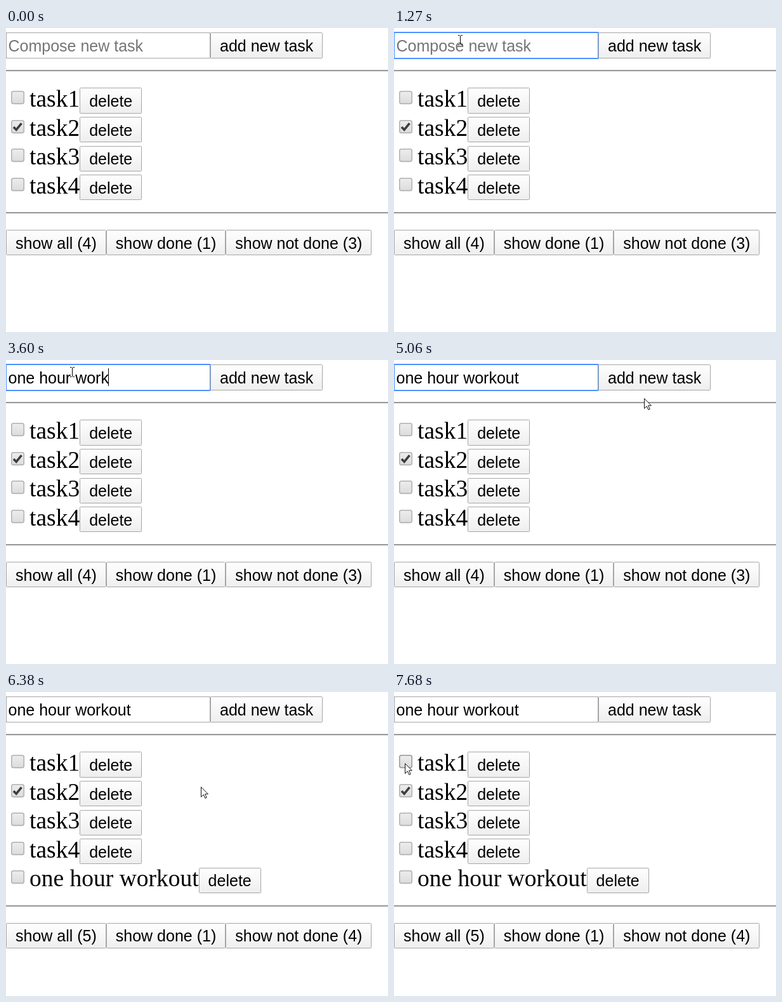
Write an HTML page that moves like this. It is 602 px wide and 479 px high and loops after 8 s.

```html
<!DOCTYPE html>
<html lang="en">
<head>
<meta charset="utf-8">
<title>Task list</title>
<style>
  html, body { margin: 0; width: 100%; height: 100%; overflow: hidden; background: #fff; }
  svg { display: block; width: 602px; height: 479px; }
  text { white-space: pre; }
  .ui { font: 25px "Liberation Sans", Arial, sans-serif; }
  .task { font: 37.5px "Liberation Serif", "Times New Roman", serif; }
</style>
</head>
<body>
<svg viewBox="0 0 602 479">
  <defs>
    <linearGradient id="face" x2="0" y2="1">
      <stop stop-color="#fefefe"/><stop offset=".4" stop-color="#f8f8f8"/><stop offset="1" stop-color="#eee"/>
    </linearGradient>
    <linearGradient id="down" x2="0" y2="1">
      <stop stop-color="#e4e4e4"/><stop offset="1" stop-color="#f0f0f0"/>
    </linearGradient>
    <linearGradient id="box" x2="0" y2="1">
      <stop stop-color="#ededed"/><stop offset="1" stop-color="#dcdcdc"/>
    </linearGradient>
  </defs>
  <g id="page"></g>
</svg>
<script>
const LOOP = 8000, FOCUS = 720, PRESS = 5760, ADDED = 5920, BLINK = 530;
const ROW = 45.6, LIST = 94.4, BUTTON_H = 40.2, BASELINE = 29.6, PAD = 15;
const TEXT_X = 3.5, TASK_X = 37;

const phrase = "one hour workout";
const bursts = [
  { at: 1720, gap: 156, size: 13 },
  { at: 3990, gap: 115, size: 3 }
];
// Pointer waypoints: time, x, y
const path = [
  [70, 376, 367], [560, 104, 19],
  [4860, 104, 19], [5060, 394, 60], [5360, 446, 29],
  [6240, 446, 29], [6380, 308, 149], [6700, 50, 273],
  [7080, 11, 143], [7280, 17, 117], [7680, 17, 112]
];

const page = document.getElementById("page");
const pen = document.createElement("canvas").getContext("2d");

function measure(str, font) {
  pen.font = font;
  return pen.measureText(str).width;
}
const uiWidth = str => measure(str, '25px "Liberation Sans", Arial, sans-serif');
const taskWidth = str => measure(str, '37.5px "Liberation Serif", "Times New Roman", serif');

const between = (t, a, b) => t >= a && t < b;
const over = (p, x, y, w, h) => p && between(p.x, x, x + w) && between(p.y, y, y + h);

function rect(x, y, w, h, attrs) {
  return `<rect x="${x}" y="${y}" width="${w}" height="${h}" ${attrs}/>`;
}
function label(x, y, str, cls = "ui", fill = "#000") {
  return `<text x="${x}" y="${Math.round(y)}" class="${cls}" fill="${fill}">${str}</text>`;
}

function pointerAt(t) {
  const i = path.filter(p => p[0] <= t).length;
  if (!i) return null;
  const a = path[i - 1], b = path[i] || a;
  const k = b === a ? 0 : (t - a[0]) / (b[0] - a[0]);
  const mix = n => Math.round(a[n] + (b[n] - a[n]) * k);
  return { x: mix(1), y: mix(2) };
}

// Number of letters typed and the time of the latest key
function typing(t) {
  let count = 0, last = FOCUS;
  for (const { at, gap, size } of bursts) {
    if (t < at) break;
    const n = Math.min(size, Math.floor((t - at) / gap) + 1);
    count += n;
    last = at + (n - 1) * gap;
  }
  return { count, last };
}

// Edges snap to whole pixels, the caption keeps its own place
function button(x, y, str, pointer, pressed) {
  const left = Math.round(x), top = Math.round(y);
  const w = Math.round(x + uiWidth(str) + 2 * PAD) - left;
  const h = Math.round(y + BUTTON_H) - top;
  const line = over(pointer, left, top, w, h) ? "#7c7c7c" : "#a6a6a6";
  const fill = pressed ? "down" : "face";
  return rect(left + .5, top + .5, w - 1, h - 1, `rx="1" fill="url(#${fill})" stroke="${line}"`)
    + label(x + PAD, y + BASELINE, str);
}

function checkbox(x, y, checked, pointer) {
  const line = over(pointer, x, y, 21, 21) ? "#959595" : "#b0b0b0";
  let out = rect(x + .5, y + 1.5, 20, 20, 'rx="3.5" fill="#000" opacity=".09"')
    + rect(x + .75, y + .75, 19.5, 19.5, `rx="3" fill="url(#box)" stroke="${line}" stroke-width="1.5"`);
  if (checked) {
    out += `<path d="M${x + 4} ${y + 11}l4.2 4.4l8.3 -10.2" fill="none" stroke="#3c3c3c" stroke-width="3.6"/>`;
  }
  return out;
}

function rule(y) {
  return rect(0, y, 602, 2, 'fill="#9a9a9a"') + rect(0, y + 2, 602, 1, 'fill="#eee"');
}

function field(t) {
  const focused = between(t, FOCUS, PRESS);
  const { count, last } = typing(t);
  const typed = phrase.slice(0, count);
  let out = focused
    ? rect(0, 7, 322, 41, 'rx="1" fill="#fff" stroke="#4d90fe" stroke-width="2"')
    : rect(.5, 7.5, 321, 40, 'fill="#fff" stroke="#a6a6a6"');
  out += label(TEXT_X, 37, typed || "Compose new task", "ui", typed ? "#000" : "#757575");
  if (focused && Math.floor((t - last) / BLINK) % 2 === 0) {
    const x = Math.max(4, Math.floor(TEXT_X + uiWidth(typed)));
    out += rect(x, 13, 1, 28, 'fill="#000"');
  }
  return out;
}

function taskRow(name, i, pointer) {
  const y = LIST + ROW * i;
  return checkbox(8, Math.round(y + 4.6), i === 1, pointer)
    + label(TASK_X, y + BASELINE, name, "task")
    + button(TASK_X + taskWidth(name), y, "delete", pointer);
}

function footer(y, captions, pointer) {
  let x = 0, out = "";
  for (const str of captions) {
    out += button(x, y, str, pointer);
    x += uiWidth(str) + 2 * PAD;
  }
  return out;
}

function cursor(p) {
  if (!p) return "";
  const shape = over(p, 0, 7, 322, 41)
    ? '<path d="M-3 -7.5h2.5M1.5 -7.5h2.5M.5 -7v14M-3 7.5h2.5M1.5 7.5h2.5" fill="none" stroke="#000"/>'
    : '<path d="M.5 .7V16.4L4.3 12.8L6.9 18.4L9.2 17.4L6.7 11.8H11.4Z" fill="#fff" stroke="#111" stroke-linejoin="round"/>';
  return `<g transform="translate(${p.x} ${p.y})">${shape}</g>`;
}

function scene(t) {
  const pointer = pointerAt(t);
  const tasks = ["task1", "task2", "task3", "task4"];
  if (t >= ADDED) tasks.push(phrase);
  const n = tasks.length;
  const end = LIST + ROW * n;
  return field(t)
    + button(322, 7.4, "add new task", pointer, between(t, PRESS, ADDED))
    + rule(66)
    + tasks.map((name, i) => taskRow(name, i, pointer)).join("")
    + rule(Math.round(end + 13.2))
    + footer(end + 41.2, [`show all (${n})`, "show done (1)", `show not done (${n - 1})`], pointer)
    + cursor(pointer);
}

let shown = "";
const start = performance.now();
function tick() {
  const next = scene((performance.now() - start) % LOOP);
  if (next !== shown) page.innerHTML = shown = next;
  requestAnimationFrame(tick);
}
tick();
</script>
</body>
</html>
```
